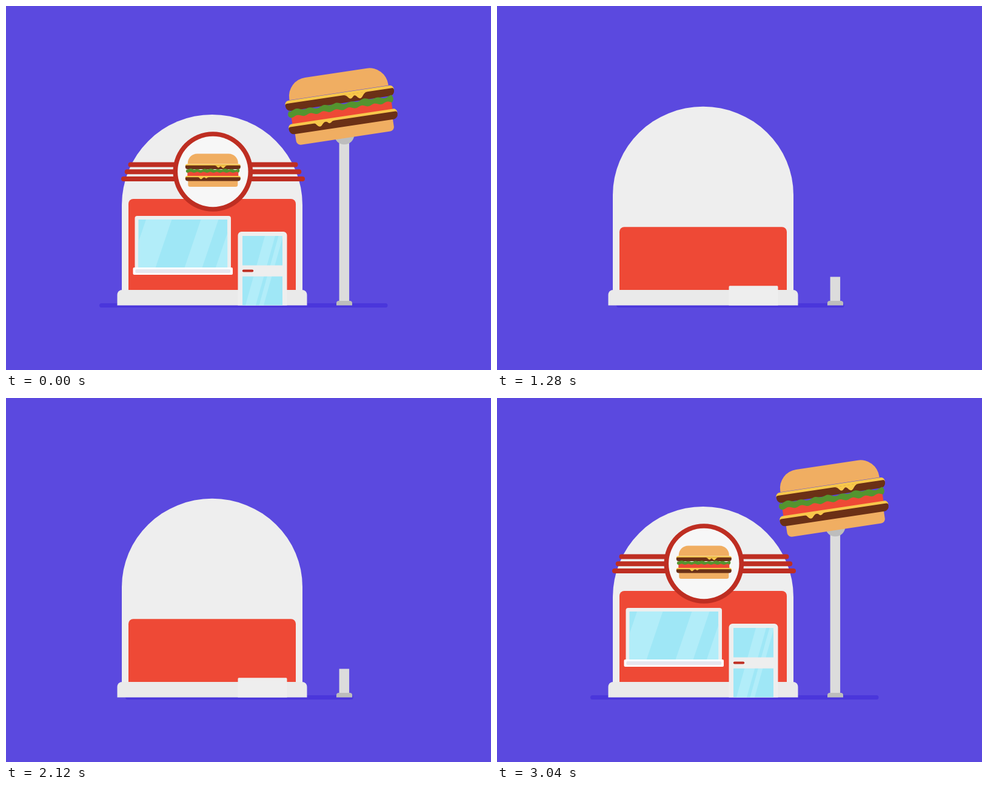
Write an HTML page with a canvas that moves like this. It is 800 px wide and 600 px high and loops after 3600 ms.

```html
<!DOCTYPE html>
<html lang="en">
<head>
<meta charset="utf-8">
<title>Burger diner</title>
<style>
  html, body { margin: 0; width: 100%; height: 100%; overflow: hidden; background: #5b49df; }
  canvas { display: block; width: 800px; height: 600px; }
</style>
</head>
<body>
<canvas id="stage" width="800" height="600"></canvas>
<script>
const c = document.getElementById('stage').getContext('2d');

const LOOP = 3600, STEP = 40, BUILD = 1240;
const BG = '#5b49df', GROUND = '#4a36db', WALL = '#eeeeee', BASE = '#eaeaea',
  RED = '#ee4936', DARK = '#be2e22', PALE = '#f7f7f7', POLE = '#dcdcdc', STEEL = '#bdbdbd',
  GLASS = '#9fe7f6', SHINE = '#b2edf9', BUN = '#f0ae62', CHEESE = '#f8c74b',
  MEAT = '#6b3016', LEAF = '#54942f';

// Easing over build time b, in ms
const part = (b, start, dur) => Math.min(1, Math.max(0, (b - start) / dur));
const out = (b, start, dur, power = 3) => 1 - (1 - part(b, start, dur)) ** power;
const back = (b, start, dur, k = 1.70158) => {
  const x = part(b, start, dur) - 1;
  return 1 + (k + 1) * x ** 3 + k * x * x;
};

// Drawing helpers
function box(x, y, w, h, r, color) {
  if (w <= 0 || h <= 0) return;
  c.fillStyle = color;
  c.beginPath();
  c.roundRect(x, y, w, h, r);
  c.fill();
}
const wide = (cx, y, w, h, r, color) => box(cx - w / 2, y, w, h, r, color);
const rise = (x, bottom, w, h, r, color) => box(x, bottom - h, w, h, [r, r, 0, 0], color);
function disc(x, y, r, color) {
  if (r <= 0) return;
  c.fillStyle = color;
  c.beginPath();
  c.arc(x, y, r, 0, 7);
  c.fill();
}
function shape(d, color) {
  c.fillStyle = color;
  c.fill(new Path2D(d));
}
function placed(x, y, scale, deg, draw) {
  if (scale <= 0) return;
  c.save();
  c.translate(x, y);
  c.rotate(deg * Math.PI / 180);
  c.scale(scale, scale);
  draw();
  c.restore();
}

// Glass with slanted light; a band is left and right at height top, then how far each edge travels
function pane(b, x, y, w, h, top, slope, bands) {
  if (w <= 0 || h <= 0) return;
  const away = 1 - part(b, 640, 480) ** 2, y2 = y + h;
  const at = (edge, row) => edge - slope * (row - top);
  c.save();
  c.beginPath();
  c.rect(x, y, w, h);
  c.clip();
  box(x, y, w, h, 0, GLASS);
  for (const [left, right, dl, dr] of bands) {
    const l = left - dl * away, r = right - dr * away;
    if (r > l) shape(`M${at(l, y)} ${y}H${at(r, y)}L${at(r, y2)} ${y2}H${at(l, y2)}Z`, SHINE);
  }
  c.restore();
}

function patty(y) {
  box(-90.5, y, 181, 7, [6, 6, 0, 0], CHEESE);
  box(-90.5, y + 4.6, 181, 12.6, [3, 3, 8, 8], MEAT);
}

function lettuce() {
  c.fillStyle = LEAF;
  c.beginPath();
  for (let x = -85; x <= 85; x += 2) c.lineTo(x, -5.2 + 1.4 * Math.sin(x / 3.6) + Math.sin(x / 9));
  c.quadraticCurveTo(90, 0, 85, 5);
  for (let x = 85; x >= -85; x -= 2) c.lineTo(x, 4.8 + 1.5 * Math.sin(x / 3.4 + 1));
  c.quadraticCurveTo(-92, 2, -85, -6);
  c.fill();
}

function burger() {
  box(-82.5, -56, 165, 33, [31, 31, 0, 0], BUN);
  box(-81.5, 32, 163, 20.5, [0, 0, 7, 7], BUN);
  box(-83.5, 2, 167, 16, 0, RED);
  patty(-22.4);
  shape('M6 -18Q12 -17 14 -13Q18 -8 22 -13Q25 -17 28 -13Q33 -5 38 -12Q42 -18 48 -18Z', CHEESE);
  lettuce();
  patty(16.4);
  shape('M-51 20Q-46 20 -44 24Q-39 31 -34 24Q-29 19 -26 22Q-22 27 -18 22Q-14 20 -9 20Z', CHEESE);
}

function building(b) {
  // The walls lead, the arch on top follows
  const wall = 165 * back(b, 73, 425), arch = Math.max(0, 149 * back(b, 171, 425));
  if (wall > 0) shape(`M191 493V${493 - wall}a149 ${arch} 0 0 1 298 0V493Z`, WALL);
  rise(202, 468, 276, 150 * back(b, 211, 560), 8, RED);
  rise(183.5, 493.5, 313, 25.5 * out(b, 0, 280), 8, BASE);
}

function shopWindow(b) {
  const cx = 291.75, grow = i => out(b, 324 + 40 * i, 514);
  wide(cx, 346, 158.5 * grow(0), 94, 4, WALL);
  const w = 147 * grow(1);
  pane(b, cx - w / 2, 351.7, w, 79.3, 351.7, 0.338,
    [[231, 273.5, 16, 30], [321.5, 350.5, 13, 28], [372.8, 420, -19, 0]]);
  wide(cx, 431, 164.5 * grow(2), 12, 2, '#ffffff');
  wide(cx, 434, 157 * grow(3), 6, 2, '#e6e6ee');
}

function door(b) {
  const leaf = out(b, 264, 574), inner = out(b, 347, 574);
  rise(382.5, 493.5, 81, 121.5 * leaf, 6 * leaf, WALL);
  const h = 114.5 * inner;
  pane(b, 390, 493.5 - h, 66, h, 379, 0.28, [[427, 444, 17, 26], [449.5, 457, 17, 25]]);
  wide(423, 427.4 + 17 * (1 - inner), 66 * inner, 18.4, 0, WALL);
  const y = 436.5 + 3.4 * Math.cos(1.5 * Math.PI * part(b, 640, 480));
  const turn = -130 * (1 - out(b, 640, 320, 2));
  placed(399, y, back(b, 627, 360), turn, () => box(-9.2, -2, 18.4, 4, 2, DARK));
}

function sign(b) {
  for (let i = 0; i < 3; i++) {
    const s = out(b, 431 + 77 * i, 514);
    wide(341.5, 257.6 + 11.7 * i - 15.5 * (1 - s), (280 + 11.5 * i) * s, 8, 4, DARK);
  }
  const cx = 341.3, pivot = 245, ring = back(b, 544, 400), face = back(b, 576, 400);
  disc(cx, pivot + 28 * ring, 65.8 * ring, DARK);
  disc(cx, pivot + 28 * face, 58.2 * face, PALE);
  const s = out(b, 582, 420, 2), turn = -167 * (1 - out(b, 582, 420, 1.68));
  placed(cx, 243.5 + 28.2 * s, 0.503 * s, turn, burger);
}

function tower(b) {
  const h = 275 * out(b, 297, 300, 2);
  box(549.6, 487 - h, 16.5, h, 0, POLE);
  wide(558, 486, 26 * back(b, 57, 280), 7.6, [4, 4, 0, 0], STEEL);
  disc(558, 211.7, 16.6 * back(b, 480, 320, 2.75), STEEL);
  // The burger spins up, then falls onto the pole and tilts
  const lift = 96 * out(b, 480, 256, 2), fall = 50.7 * part(b, 752, 343) ** 2;
  const turn = -244 * (1 - out(b, 480, 480)) - 4.6 - 3.9 * out(b, 960, 280, 2);
  placed(552.5, 211 - lift + fall, out(b, 480, 300, 2), turn, burger);
}

function draw(now) {
  const t = Math.floor(now % LOOP / STEP) * STEP;
  // Taking the scene down is the build played backwards
  const b = Math.min(BUILD, Math.max(0, t < 1700 ? 1600 - t : t - 1800));
  box(0, 0, 800, 600, 0, BG);
  if (b === 0) return;
  const g = out(b, 0, 640, 2.25);
  box(359 - 205 * g, 490, 475.5 * g, 7, 3.5, GROUND);
  for (const paint of [building, shopWindow, door, sign, tower]) paint(b);
}

const start = performance.now();
function tick() {
  draw(performance.now() - start);
  requestAnimationFrame(tick);
}
tick();
</script>
</body>
</html>
```
